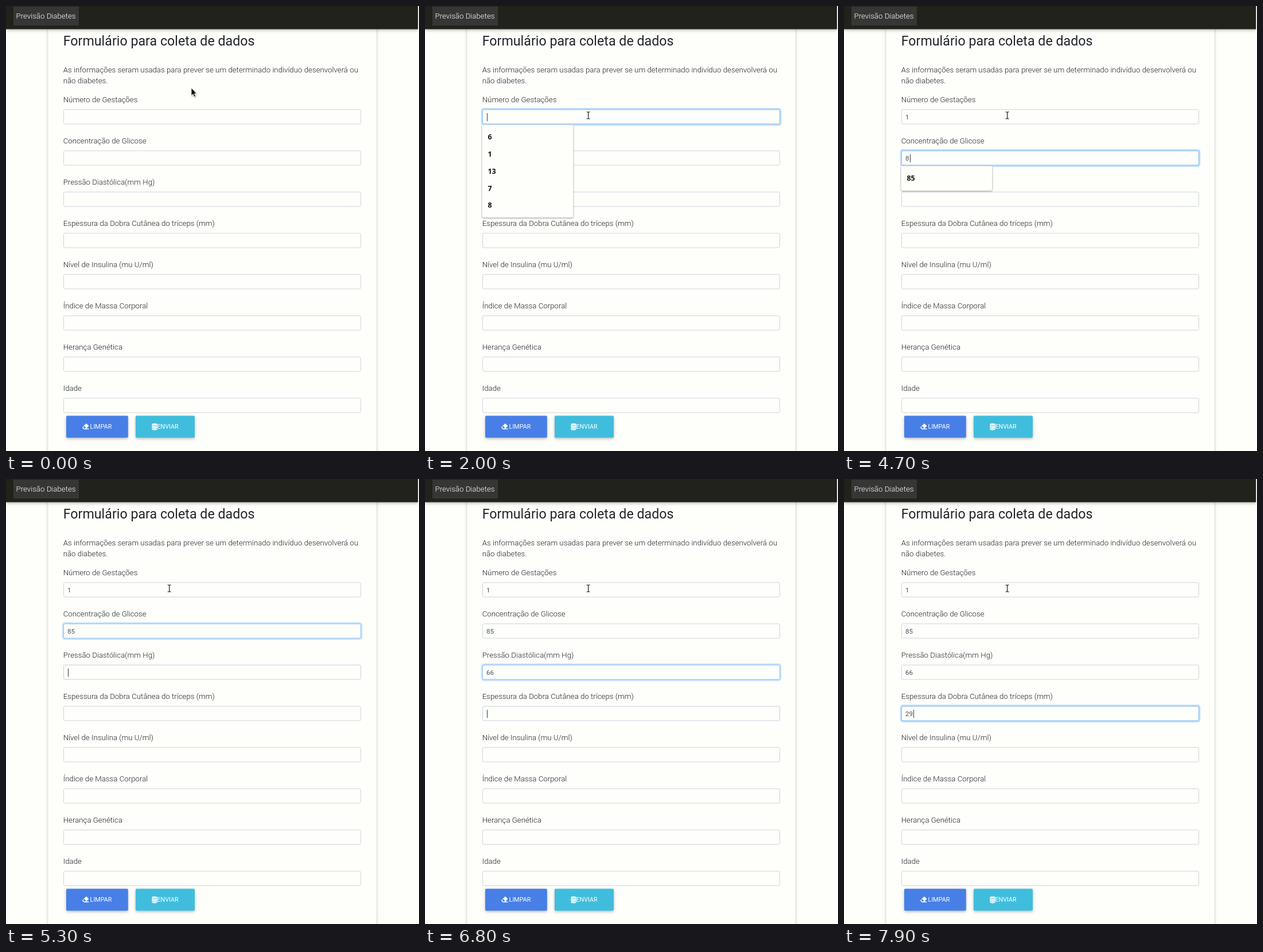
Write an HTML page that moves like this. It is 720 px wide and 777 px high and loops after 8000 ms.

```html
<!DOCTYPE html>
<html lang="pt">
<head>
<meta charset="utf-8">
<title>Formulário</title>
<style>
  html, body { margin: 0; width: 100%; height: 100%; overflow: hidden; background: #fefffb; }
  svg { display: block; width: 720px; height: 777px; }
  text { font-family: Roboto, sans-serif; fill: #212529; white-space: pre; }
  .body { font-size: 13.28px; font-weight: 300; }
  .title { font-size: 23.24px; font-weight: 400; }
  .nav { font-size: 13.28px; font-weight: 300; fill: #fff; }
  .value { font-size: 11.62px; font-weight: 400; fill: #495057; }
  .btn { font-size: 10.76px; font-weight: 400; fill: #fff; }
  .item { font: 700 12.5px "Noto Sans", "Open Sans", sans-serif; fill: #111; }
</style>
</head>
<body>
<svg id="stage" viewBox="0 0 720 777" xmlns="http://www.w3.org/2000/svg">
  <defs>
    <filter id="raise" filterUnits="userSpaceOnUse" x="-20" y="-20" width="760" height="900">
      <feDropShadow dx="0" dy="1.7" stdDeviation="2" flood-color="#000" flood-opacity=".2"/>
      <feDropShadow dx="0" dy="1.7" stdDeviation="3.5" flood-color="#000" flood-opacity=".1"/>
    </filter>
    <filter id="lift" filterUnits="userSpaceOnUse" x="80" y="180" width="200" height="320">
      <feDropShadow dx="0" dy="1" stdDeviation="1.1" flood-color="#000" flood-opacity=".4"/>
    </filter>
    <filter id="soft" x="-50%" y="-50%" width="200%" height="200%">
      <feDropShadow dx="1" dy="1.5" stdDeviation="1" flood-color="#000" flood-opacity=".3"/>
    </filter>
  </defs>

  <rect width="720" height="777" fill="#fefffb"/>
  <rect x="73.8" y="-10" width="571.7" height="820" fill="#fefffb" filter="url(#raise)"/>
  <rect width="718.5" height="40.5" fill="#20211d" filter="url(#raise)"/>
  <rect x="718.5" width="1.5" height="777" fill="#fefefe"/>
  <rect x="13" y="1" width="114" height="33" fill="#363734"/>
  <text class="nav" x="17.5" y="21.5">Previsão Diabetes</text>

  <text class="title" x="99.7" y="69">Formulário para coleta de dados</text>
  <text class="body" x="99.7" y="115.5">As informações seram usadas para prever se um determinado indivíduo desenvolverá ou</text>
  <text class="body" x="99.7" y="135.3">não diabetes.</text>

  <g id="form"></g>

  <g filter="url(#raise)">
    <rect x="105" y="715.5" width="107.8" height="38.3" rx="1.7" fill="#467fe7"/>
    <rect x="226" y="715.5" width="103" height="38.3" rx="1.7" fill="#3fbddd"/>
  </g>
  <!-- eraser -->
  <path transform="translate(-.6 0)" d="M134 735.2 139.8 729.4Q140.6 728.8 141.4 729.4L144.4 732.4Q145 733.2 144.4 734L140.6 737.8H145V739.3H136.6L134 736.8Q133.3 736 134 735.2ZM137.3 737.8H138.6L140 736.4 136.9 733.3 135 735.5Z" fill="#fff" fill-rule="evenodd"/>
  <!-- database -->
  <g fill="#fff">
    <ellipse cx="259" cy="730.6" rx="4.8" ry="1.9"/>
    <path id="disc" d="M254.2 732Q259 734.8 263.8 732V733.9Q259 736.9 254.2 733.9Z"/>
    <use href="#disc" y="2.7"/>
    <use href="#disc" y="5.4"/>
  </g>
  <text class="btn" x="146.6" y="738.3">LIMPAR</text>
  <text class="btn" x="263.4" y="738.3">ENVIAR</text>

  <rect id="caret" width="1" height="14" fill="#343a40"/>
  <g id="popup">
    <rect id="panel" x="99.5" width="159" rx="2.5" fill="#fefffb" stroke="#d2d2d0" stroke-width=".6" filter="url(#lift)"/>
    <g id="items"></g>
  </g>
  <path id="arrow" d="M0 0V13.6L3.1 10.8 5.2 15.8 7.5 14.8 5.4 10H9.4Z" fill="#111" stroke="#fff" stroke-width=".8" filter="url(#soft)"/>
  <g id="beam" fill="none">
    <path d="M-3-6H-1L0-5 1-6H3M0-5V5M-3 6H-1L0 5 1 6H3" stroke="#fff" stroke-width="2.6"/>
    <path d="M-3-6H-1L0-5 1-6H3M0-5V5M-3 6H-1L0 5 1 6H3" stroke="#1a1a1a" stroke-width="1.2"/>
  </g>
</svg>
<script>
const LOOP = 8000, STEP = 100, TOP = 180, PITCH = 72, ROW = 29.75;
const $ = id => document.getElementById(id);

const labels = [
  'Número de Gestações', 'Concentração de Glicose', 'Pressão Diastólica(mm Hg)',
  'Espessura da Dobra Cutânea do tríceps (mm)', 'Nível de Insulina (mu U/ml)',
  'Índice de Massa Corporal', 'Herança Genética', 'Idade'
];
const focusAt = [830, 2950, 5270, 6770];
const typing = [
  [[2600, '1']],
  [[4700, '8'], [5000, '85']],
  [[6300, '6'], [6500, '66']],
  [[7400, '2'], [7700, '29']]
];
const caretOn = [[900, 1400], [2000, 3500], [4200, 6000], [6300, 8000]];
// time, field, suggestions, opacity
const popups = [
  [900, 0, '6 1 13 7 8', 1], [2700, 0, '1 13', 1], [3000, 0, '1 13', .8], [3100],
  [4700, 1, '85', 1], [5100, 1, '85', .8], [5200],
  [6300, 2, '66 64', 1], [6500, 2, '66', 1], [6600, 2, '66', .8], [6700],
  [7400, 3, '29', .8], [7500, 3, '29', 1], [7800, 3, '29', .8], [7900]
];

function add(parent, tag, attrs, text = '') {
  const el = document.createElementNS('http://www.w3.org/2000/svg', tag);
  set(el, attrs);
  el.textContent = text;
  return parent.appendChild(el);
}
function set(el, attrs) {
  for (const k in attrs) el.setAttribute(k, attrs[k]);
}
const smooth = x => {
  x = Math.min(1, Math.max(0, x));
  return x * x * (3 - 2 * x);
};
const latest = (list, t) => list.filter(e => e[0] <= t).pop();

const fields = labels.map((label, i) => {
  const y = TOP + PITCH * i, form = $('form');
  add(form, 'text', { class: 'body', x: 99.7, y: y - 12 }, label);
  const box = { x: 100.5, y: y + .8, width: 518, height: 25.2, rx: 2.4, fill: 'none' };
  add(form, 'rect', { ...box, stroke: '#ced4da' });
  const halo = add(form, 'rect', { x: 98.8, y: y - .9, width: 521.4, height: 28.6, rx: 3.6,
    fill: 'none', stroke: '#bfdeff', 'stroke-width': 2.4 });
  const edge = add(form, 'rect', { ...box, stroke: '#80bdff' });
  const value = add(form, 'text', { class: 'value', x: 107, y: y + 18 });
  return { halo, edge, value };
});

function drawPopup(t) {
  const [, field, list, alpha] = latest(popups, t) || [];
  $('popup').style.display = list ? '' : 'none';
  if (!list) return;
  const names = list.split(' ');
  const y = TOP + 27.3 + PITCH * field, h = ROW * (names.length - 1) + 43;
  set($('panel'), { y, height: h });
  $('items').replaceChildren();
  names.forEach((name, k) =>
    add($('items'), 'text', { class: 'item', x: 109.4, y: y + 26 + ROW * k }, name));
  const s = alpha < 1 ? .985 : 1, cx = 179, cy = y + h / 2;
  set($('popup'), { opacity: alpha,
    transform: `translate(${cx} ${cy}) scale(${s}) translate(${-cx} ${-cy})` });
}

function drawPointer(t) {
  const p = smooth((t - 100) / 700);
  const x = 323 - 38.3 * p, y = 143 + 48 * p, over = y > TOP;
  $('arrow').style.display = over ? 'none' : '';
  $('beam').style.display = over ? '' : 'none';
  set($('arrow'), { transform: `translate(${x} ${y})` });
  set($('beam'), { transform: `translate(${x} ${y})` });
}

function draw(t) {
  let active = -1;
  fields.forEach(({ halo, edge, value }, i) => {
    if (focusAt[i] <= t) active = i;
    const level = at => at === undefined ? 0 : smooth((t - at) / 150);
    const focus = level(focusAt[i]) - level(focusAt[i + 1]);
    set(edge, { opacity: focus });
    set(halo, { opacity: focus * focus });
    const typed = latest(typing[i] || [], t);
    value.textContent = typed ? typed[1] : '';
  });
  const lit = active >= 0 && caretOn.some(([a, b]) => t >= a && t < b);
  $('caret').style.display = lit ? '' : 'none';
  if (lit) set($('caret'), {
    x: Math.round(108 + 6.56 * fields[active].value.textContent.length),
    y: TOP + 7 + PITCH * active
  });
  drawPopup(t);
  drawPointer(t);
}

const start = performance.now();
function tick(now) {
  const t = Math.max(0, now - start) % LOOP;
  draw(Math.floor(t / STEP) * STEP);
  requestAnimationFrame(tick);
}
draw(0);
requestAnimationFrame(tick);
</script>
</body>
</html>
```
